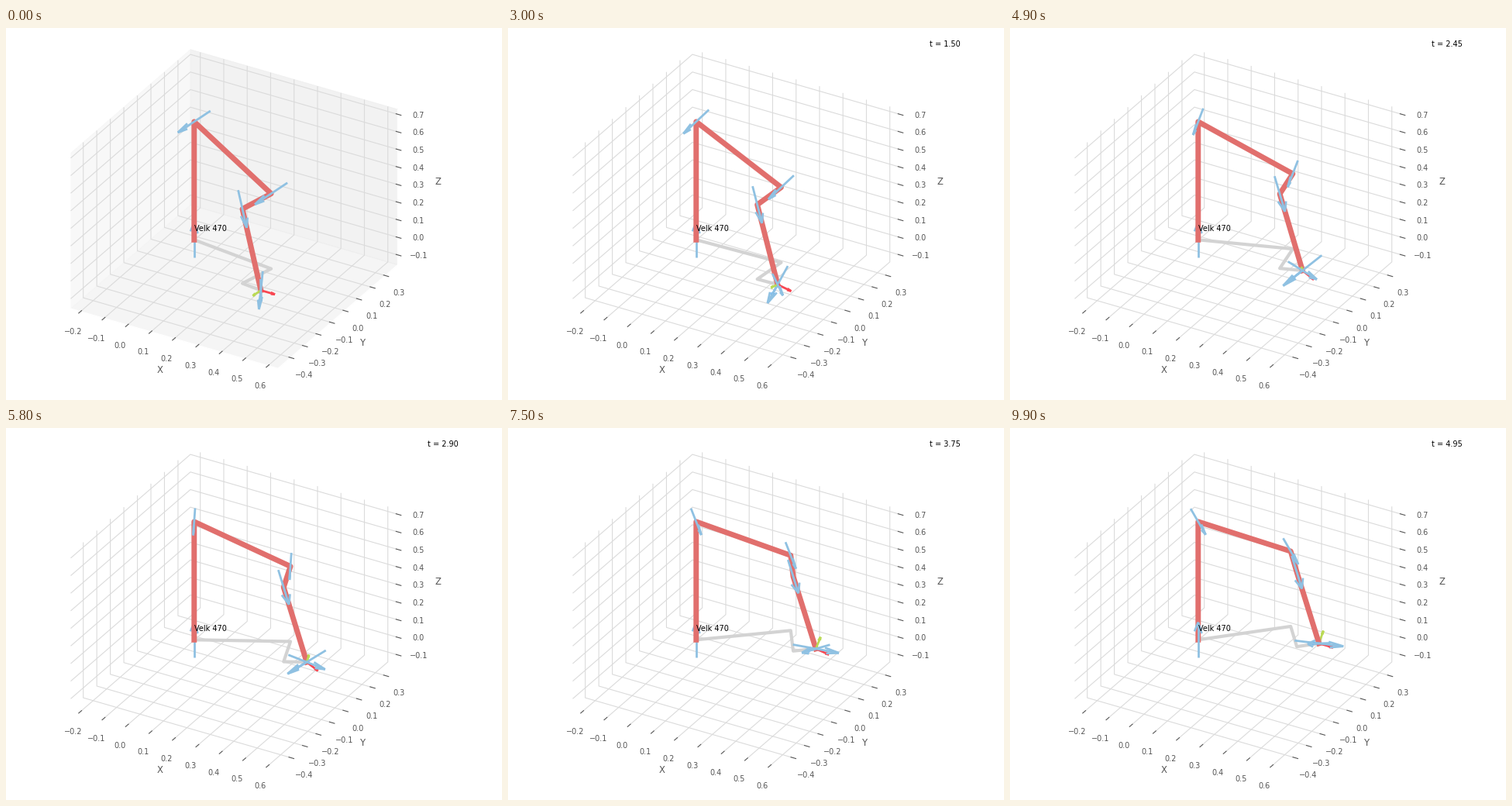
These frames come from a looping animation (640x480 px, 10000 ms). A matplotlib script:

```python
import numpy as np
import matplotlib.pyplot as plt
from matplotlib.animation import FuncAnimation

FRAMES, DT = 100, 0.05

plt.style.use("ggplot")
plt.rcParams.update({
    "font.family": "DejaVu Sans",
    "font.size": 7,
    "axes.labelpad": 1,
    "grid.color": "#dbdbdb",
    "grid.linestyle": "-",
})

# Denavit-Hartenberg parameters of the six-axis arm
D = [0.6718, 0, 0.15005, 0.4318, 0, 0]
A = [0, 0.4318, 0.0203, 0, 0, 0]
ALPHA = [np.pi / 2, 0, -np.pi / 2, np.pi / 2, -np.pi / 2, 0]


def rot_x(a):
    c, s = np.cos(a), np.sin(a)
    return np.array([[1, 0, 0], [0, c, -s], [0, s, c]])


def rot_z(a):
    c, s = np.cos(a), np.sin(a)
    return np.array([[c, -s, 0], [s, c, 0], [0, 0, 1]])


def forward(q):
    """Origins and rotations of the base and every joint frame."""
    p, R = np.zeros(3), np.eye(3)
    points, rots = [p], [R]
    for qi, d, a, alpha in zip(q, D, A, ALPHA):
        R = R @ rot_z(qi)
        p = p + R @ [a, 0, d]
        R = R @ rot_x(alpha)
        points.append(p)
        rots.append(R)
    return np.array(points), rots


def inverse(p, R):
    """Joint angles for a wrist pose: right arm, elbow up, no wrist flip."""
    x, y, z = p
    q1 = np.arctan2(y, x) + np.arcsin(D[2] / np.hypot(x, y))
    r, h = np.sqrt(x**2 + y**2 - D[2]**2), z - D[0]
    reach2, fore2 = r**2 + h**2, A[2]**2 + D[3]**2
    cos_s = (A[1]**2 + reach2 - fore2) / (2 * A[1] * np.sqrt(reach2))
    q2 = np.arctan2(h, r) + np.arccos(cos_s)
    vr, vh = r - A[1] * np.cos(q2), h - A[1] * np.sin(q2)
    q3 = np.arctan2(vh, vr) - np.arctan2(D[3], A[2]) - q2

    W = forward([q1, q2, q3])[1][3].T @ R
    q4 = np.arctan2(W[1, 2], W[0, 2])
    c, s = np.cos(q4), np.sin(q4)
    q5 = -np.arctan2(c * W[0, 2] + s * W[1, 2], W[2, 2])
    q6 = np.arctan2(c * W[1, 0] - s * W[0, 0], c * W[1, 1] - s * W[0, 1])
    return np.array([q1, q2, q3, q4, q5, q6])


q_start = inverse((0.4, -0.2, 0), rot_x(3))
q_end = inverse((0.4, 0.2, 0), rot_x(1))

fig = plt.figure(figsize=(6.4, 4.8), dpi=100)
fig.subplots_adjust(left=-0.09, bottom=0, top=1, right=0.99)
ax = fig.add_subplot(projection="3d", proj_type="ortho")
ax.set_facecolor("white")
ax.view_init(elev=30, azim=-60)
ax.set(xlabel="X", ylabel="Y", zlabel="Z")

# Equal ranges, sized by the height of the arm plus margins
half = (D[0] + 0.1) * 1.1 * 25 / 24 / 2
y_mid = (0.1 * np.cos(q_start[0]) - 0.2) / 2
z_mid = (D[0] - 0.1) / 2
ax.set_xlim(0.2 - half, 0.2 + half)
ax.set_ylim(y_mid - half, y_mid + half)
ax.set_zlim(z_mid - half, z_mid + half)

ax.text(0, 0, 0.05, "Velk 470")
shadow, = ax.plot([0], [0], [0], color="lightgrey", linewidth=3)
links, = ax.plot([0], [0], [0], color="#E16F6D", linewidth=5)
timer = fig.text(0.85, 0.95, "")
arrows = []


def add_arrow(start, vec, color):
    arrows.append(ax.quiver(*start, *vec, color=color, linewidth=2))


def update(i):
    u = i / (FRAMES - 1)
    ease = u**3 * (10 - 15 * u + 6 * u**2)
    points, rots = forward(q_start + (q_end - q_start) * ease)

    x, y, z = points.T
    links.set_data_3d(x, y, z)
    shadow.set_data_3d(x, y, 0 * z)

    while arrows:
        arrows.pop().remove()
    for axis, color in zip(rots[-1].T, ("#F84752", "#BADA55", "#54AEFF")):
        add_arrow(points[-1], 0.06 * axis, color)
    for p, R in zip(points[:-1], rots):
        vec = 0.2 * R[:, 2]
        add_arrow(p - vec / 2, vec, "#8FC1E2")

    # The opening picture has shaded walls and no clock
    for axis in (ax.xaxis, ax.yaxis, ax.zaxis):
        axis.pane.set_visible(i == 0)
    timer.set_text(f"t = {i * DT:.2f}" if i else "")


def init():
    update(0)


anim = FuncAnimation(fig, update, frames=FRAMES, init_func=init,
                     interval=100, repeat=True, repeat_delay=0)
plt.show()
```
